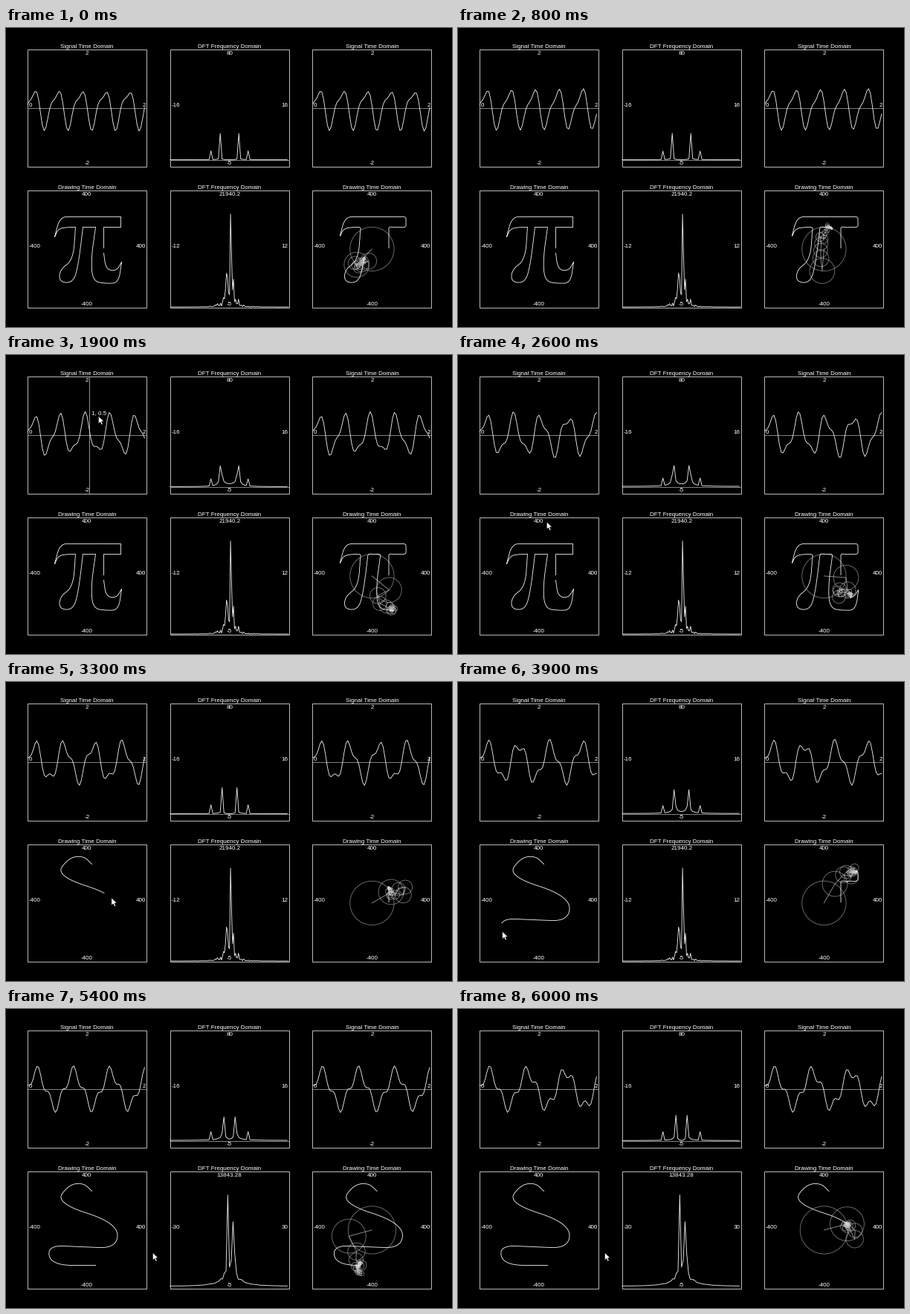
These frames come from a looping animation (600x403 px, 6100 ms). A matplotlib script:

```python
import numpy as np
import matplotlib.pyplot as plt
from matplotlib.animation import FuncAnimation
from matplotlib.collections import LineCollection
from matplotlib.patches import Polygon, Rectangle

W, H, DPI = 600, 403, 100
FRAMES, STEP = 61, 100
PX = 72 / DPI
LEFT, MID, RIGHT = 28.4, 220.2, 411.9
TOP, BOTTOM = 28.4, 218.4
BW, BH = 160, 158
SHIFT = RIGHT - LEFT
CENTER = np.array([LEFT + BW / 2, BOTTOM + BH / 2])
FLOOR = TOP + BH * 80 / 85

# Mouse timeline in seconds
ENTER, DRAW_START, DRAW_TIME, S_READY = 1.2, 2.69, 1.5, 4.3
LAG = 0.055


def smooth(points):
    """Round a control polygon by repeated corner cutting, keeping its ends."""
    p = np.array(points, float)
    for _ in range(4):
        a, b = p[:-1], p[1:]
        cut = np.stack([0.75 * a + 0.25 * b, 0.25 * a + 0.75 * b], axis=1)
        p = np.vstack([p[:1], cut.reshape(-1, 2), p[-1:]])
    return p


def along(points, u):
    """Points at fractions u of the path length."""
    d = np.r_[0, np.cumsum(np.hypot(*np.diff(points, axis=0).T))]
    u = np.asarray(u) * d[-1]
    return np.column_stack([np.interp(u, d, points[:, i]) for i in (0, 1)])


# Sharp corners lie between the strokes
PI_PATH = np.vstack([
    [(131, 296), (131, 268), (154, 268)],
    smooth([(154, 254), (90, 254), (72, 254), (65, 281)]),
    smooth([(65, 281), (70, 270), (82, 268), (93, 268)]),
    smooth([(93, 268), (90, 312), (72, 325), (71, 342), (90, 343),
            (97, 318), (103, 268)]),
    smooth([(120, 268), (114, 310), (116, 341), (135, 344), (151, 343),
            (155, 315)]),
    smooth([(155, 315), (148, 327), (134, 325), (131, 303)])])
S_PATH = smooth([(115, 245), (104, 234), (84, 236), (66, 261), (150, 288),
                 (149, 322), (100, 320), (55, 318), (60, 345), (120, 345)])


class Epicycles:
    def __init__(self, points, n, oversample, top_label, freq_label):
        p = along(points, np.linspace(0, 1, n)) - CENTER
        spectrum = np.fft.fft(p[:, 0] - 1j * p[:, 1])
        k = np.round(np.fft.fftfreq(n) * n)
        self.top_label, self.freq_label = top_label, freq_label
        order = np.argsort(-abs(spectrum))
        self.k, self.c = k[order], spectrum[order] / n
        self.steps = n * oversample
        tau = np.arange(self.steps) / self.steps
        z = np.exp(2j * np.pi * np.outer(tau, self.k)) @ self.c
        self.path = self.to_screen(z)

        mag = abs(np.fft.fftshift(spectrum))
        x = MID + BW / 2 + np.fft.fftshift(k) * BW / n
        self.plot = x, BOTTOM + BH - 0.8 - mag / mag.max() * (0.8 * BH - 1)

    @staticmethod
    def to_screen(z):
        return np.column_stack([CENTER[0] + SHIFT + z.real, CENTER[1] - z.imag])

    def pose(self, turns):
        """Trail, arm and circles after a number of turns."""
        i = int(round((turns % 1) * self.steps)) % self.steps
        v = self.c * np.exp(2j * np.pi * self.k * i / self.steps)
        joints = np.r_[0, np.cumsum(v)]
        ring = np.exp(1j * np.linspace(0, 2 * np.pi, 49))
        circles = [self.to_screen(j + abs(r) * ring) for j, r in zip(joints, v)]
        return self.path[:i + 1], self.to_screen(joints), circles


pi_cycles = Epicycles(PI_PATH, 119, 3, "21940.2", "12")
s_cycles = Epicycles(S_PATH, 68, 1, "13843.28", "30")


def cursor_pos(t):
    u = (t - DRAW_START) / DRAW_TIME
    if u < 0:
        times = [1.4, 1.9, 2.1, DRAW_START]
        return np.array([np.interp(t, times, [11, 124, 140, 115]),
                         np.interp(t, times, [127, 82, 110, 245])])
    if u <= 1:
        return along(S_PATH, [u])[0]
    ease = 1 - np.exp((DRAW_START + DRAW_TIME - t) / 0.16)
    return S_PATH[-1] + ease * np.array([77, -17])


def signal(t):
    """Slowly gliding tone plus a fixed 5 Hz tone, 64 samples in 2 s."""
    freq = 2.025 + 0.49 * np.cos(np.pi * t / 6.6)
    s = np.arange(64) / 32
    return (0.6 * np.sin(2 * np.pi * freq * s)
            - 0.2 * np.sin(10 * np.pi * s - 0.7))


plt.rcParams["font.family"] = "Liberation Sans"
fig = plt.figure(figsize=(W / DPI, H / DPI), dpi=DPI, facecolor="black")
ax = fig.add_axes([0, 0, 1, 1])
ax.set_xlim(-0.5, W - 0.5)
ax.set_ylim(H - 0.5, -0.5)
ax.axis("off")


def label(x, y, s, ha="center"):
    return ax.text(x, y, s, ha=ha, va="center_baseline", color="white",
                   fontsize=8 * PX, zorder=6)


def curve(color="#e8e8e8", lw=0.9, z=4):
    return ax.plot([], [], color=color, lw=lw * PX, zorder=z)[0]


def panel(x, y, title, top, bottom, left, right):
    ax.add_patch(Rectangle((x, y), BW, BH, fill=False, ec="#b8b8b8",
                           lw=PX, zorder=5))
    cx = x + BW / 2
    label(cx, y - 4.8, title)
    return (label(cx, y + 4.7, top), label(cx, y + BH - 5.3, bottom),
            label(x + 1.5, y + 75, left, "left"),
            label(x + BW - 1, y + 75, right, "right"))


def axis_line(x, y):
    ax.plot([x, x + BW], [y, y], color="#808080", lw=PX, zorder=2)


for x in (LEFT, RIGHT):
    panel(x, TOP, "Signal Time Domain", "2", "-2", "0", "2")
    panel(x, BOTTOM, "Drawing Time Domain", "400", "-400", "-400", "400")
    axis_line(x, TOP + BH / 2)
panel(MID, TOP, "DFT Frequency Domain", "80", "-5", "-16", "16")
dft_labels = panel(MID, BOTTOM, "DFT Frequency Domain", "", "-5", "", "")
axis_line(MID, FLOOR)

wave, wave_copy, wave_dft = curve(), curve(), curve()
drawing, drawing_dft = curve(), curve()
trail = curve()
arm = curve("#909090", 0.9, 3)
rings = LineCollection([], colors=[(0.8, 0.8, 0.8, 0.55)],
                       linewidths=0.9 * PX, zorder=3)
ax.add_collection(rings)
cross = curve("#909090", 1, 2)
readout = label(0, 0, "", "left")
ARROW = np.array([(0, 0), (0, 10), (2.4, 7.9), (4, 11.6), (5.7, 10.8),
                  (4.1, 7.2), (7.2, 7)])
arrow = Polygon(ARROW, fc="white", ec="black", lw=0.5 * PX, zorder=8)
ax.add_patch(arrow)


def draw_signal(t):
    y = signal(t)
    x = LEFT + np.arange(64) * BW / 64
    sy = TOP + BH / 2 - y * BH / 4
    wave.set_data(x, sy)
    wave_copy.set_data(x + SHIFT, sy)
    mag = abs(np.fft.fftshift(np.fft.fft(y)))
    wave_dft.set_data(MID + np.arange(64) * BW / 64, FLOOR - mag * BH / 85)


def draw_mouse(t):
    arrow.set_visible(t > ENTER)
    arrow.set_xy(ARROW + cursor_pos(t))
    mx, my = cursor_pos(t - LAG)
    inside = LEFT < mx < LEFT + BW and TOP < my < TOP + BH
    cross.set_visible(inside)
    readout.set_visible(inside)
    cross.set_data([mx, mx], [TOP, TOP + BH])
    vx = round((mx - LEFT) / BW * 2, 1)
    vy = round((TOP + BH / 2 - my) / BH * 4, 1)
    readout.set_text(f"{vx:g}, {vy:g}")
    readout.set_position((mx + 3, my - 10))


def draw_sketch(t):
    u = (t - LAG - DRAW_START) / DRAW_TIME
    if u < 0:
        drawing.set_data(*PI_PATH.T)
    else:
        drawing.set_data(*along(S_PATH, np.linspace(0, min(u, 1), 100)).T)


def draw_epicycles(t):
    if t < S_READY:
        e, turns = pi_cycles, 0.576 + t / 7.2
    else:
        e, turns = s_cycles, (t - S_READY) / 1.22
    path, joints, circles = e.pose(turns)
    trail.set_data(*path.T)
    arm.set_data(*joints.T)
    rings.set_segments(circles)
    drawing_dft.set_data(*e.plot)
    dft_labels[0].set_text(e.top_label)
    dft_labels[2].set_text("-" + e.freq_label)
    dft_labels[3].set_text(e.freq_label)


def update(i):
    t = i * STEP / 1000
    draw_signal(t)
    draw_mouse(t)
    draw_sketch(t)
    draw_epicycles(t)
    return []


anim = FuncAnimation(fig, update, frames=FRAMES, interval=STEP, repeat=True,
                     repeat_delay=0, blit=False)
plt.show()
```
